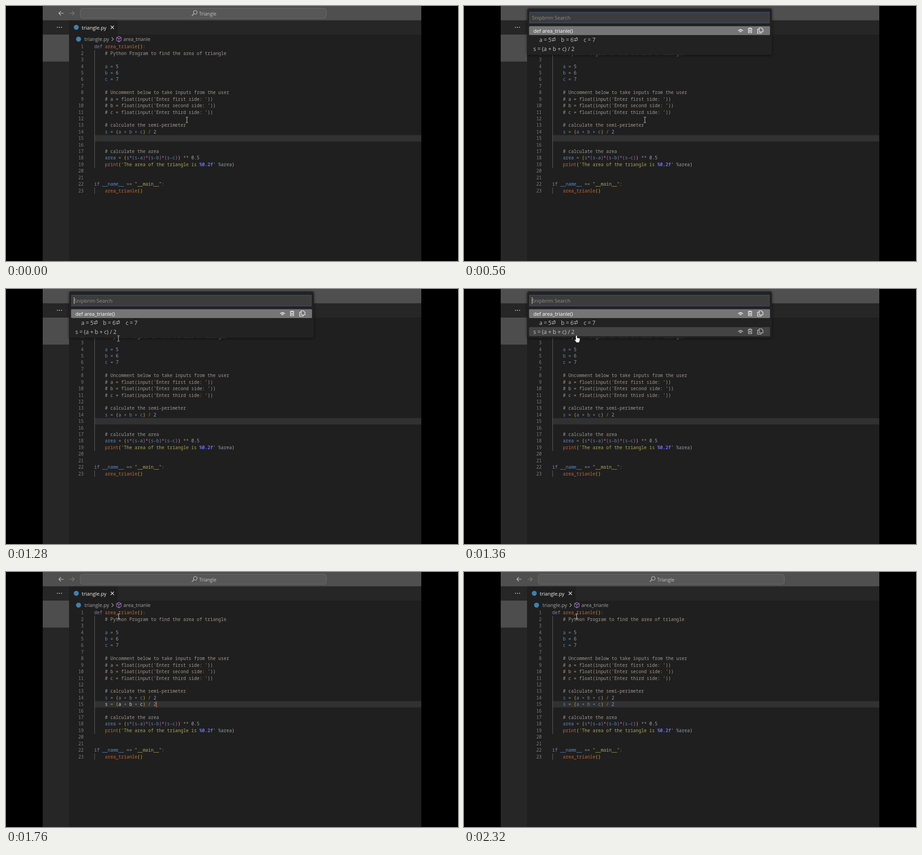
Recreate the animation shown at these times as an HTML page. Size 997 by 562 pixels, loop 2720 ms.

```html
<!DOCTYPE html>
<html lang="en">
<head>
<meta charset="utf-8">
<title>Editor clipboard search</title>
<style>
  html, body { margin: 0; width: 100%; height: 100%; overflow: hidden; background: #000; }
  svg { display: block; width: 997px; height: 562px; }
  text { white-space: pre; }
  .ui { font-family: "Open Sans", "Noto Sans", sans-serif; font-size: 11.1px; fill: #c4c4c4; }
  .code { font-family: "Noto Sans Mono", "DejaVu Sans Mono", monospace; font-size: 9.93px; }
  .num { fill: #7d7d7d; text-anchor: end; }
  .math { font-size: 12.2px; }
  .line { fill: none; stroke: #c8c8c8; stroke-width: 1.2; }
  .k { fill: #8a80ac; }
  .f { fill: #c96530; }
  .p { fill: #d8b236; }
  .m { fill: #b860b6; }
  .c { fill: #9d9993; }
  .v { fill: #5b89c2; }
  .n { fill: #8da0b6; }
  .o { fill: #888; }
  .s { fill: #a5aa56; }
  .b { fill: #6b6cf2; font-weight: bold; }
  .raw .v { fill: #d4d4d4; }
</style>
</head>
<body>
<svg viewBox="0 0 997 562" xmlns="http://www.w3.org/2000/svg">
  <defs>
    <filter id="shadow" x="-10%" y="-30%" width="120%" height="160%">
      <feDropShadow dx="0" dy="1" stdDeviation="3" flood-color="#000" flood-opacity=".6"/>
    </filter>
    <g id="actions" class="line">
      <path d="M604.5 1q5.5-7 11 0"/>
      <circle cx="610" cy="1" r="2"/>
      <path d="M626-4h10M629-4v-1.500h4v1.500M627.500-3.500v8.500h7v-8.500M630-1.500v4.500M632-1.500v4.500"/>
      <path d="M651-6h5l3.500 3.500v5.500h-8.500zM650.500-3h-3v9h8v-2.500"/>
    </g>
    <path id="return" class="line" style="stroke-width:1" d="M0-2.500h5v-2h2.500v6h-6.500M3.500-.5l-2.500 2 2.500 2"/>
  </defs>

  <rect x="81" width="835" height="562" fill="#1f1f1f"/>
  <rect x="81" width="58" height="562" fill="#262626"/>
  <rect x="139" y="31" width="777" height="32" fill="#262626"/>
  <rect x="139" y="31" width="107.500" height="32" fill="#1f1f1f"/>
  <rect x="81" width="835" height="31.500" fill="#4f4f4f"/>
  <rect x="81" y="63" width="58" height="59.500" fill="#4d4d4d"/>
  <g fill="#d0d0d0">
    <circle cx="113.500" cy="47" r="1.100"/><circle cx="118" cy="47" r="1.100"/><circle cx="122.500" cy="47" r="1.100"/>
  </g>

  <g id="title">
    <path class="line" d="M127 16h-10M121 11.500l-4.500 4.500 4.500 4.500"/>
    <path class="line" style="stroke:#808080" d="M140 16h10M146 11.500l4.500 4.500-4.500 4.500"/>
    <rect x="164" y="5" width="542.500" height="22" rx="5" fill="#575757" stroke="#6c6c6c"/>
    <path class="line" d="M410 21.500l4.500-4.500"/><circle class="line" cx="417.500" cy="14" r="4"/>
    <text class="ui" x="426" y="20.500" style="font-size:10.300px">Triangle</text>
  </g>

  <circle cx="155" cy="47" r="5.500" fill="#3f7fb0"/>
  <text class="ui" x="167" y="51.500" style="fill:#f2f2f2;font-weight:500">triangle.py</text>
  <path class="line" style="stroke:#e8e8e8" d="M231 43.500l7 7M238 43.500l-7 7"/>
  <circle cx="160" cy="73" r="5.500" fill="#3f7fb0"/>
  <text class="ui" x="173" y="77" style="fill:#a6a6a6">triangle.py</text>
  <path class="line" style="stroke:#a0a0a0" d="M233 69l4 4-4 4"/>
  <path class="line" style="stroke:#a678c8" d="M249 67l5 2.500v6.500l-5 3-5-3v-6.500zM244 69.500l5 2.500 5-2.500M249 72v7"/>
  <text class="ui" x="259" y="77" style="fill:#a6a6a6;font-size:10.800px">area_trianle</text>

  <rect x="195" y="284.500" width="721" height="14" fill="#313132"/>
  <path d="M195.500 97v260M195.500 400v14" stroke="#606060"/>
  <g id="code" class="code"></g>
  <rect id="editCaret" x="331.200" y="285" width="1.300" height="13.500" fill="#cf7b45"/>

  <g id="palette">
    <rect x="139.500" y="5.500" width="539.500" height="102" rx="4" fill="#222" filter="url(#shadow)"/>
    <rect x="144" y="13" width="530" height="25" fill="#3c3c3c"/>
    <rect id="focus" x="144.500" y="13.500" width="529" height="24" fill="none" stroke="#34508f"/>
    <text class="ui" x="150" y="30" style="fill:#8f8f8f">Snipbrim Search</text>
    <rect id="inputCaret" x="149.700" y="18" width="1.100" height="15" fill="#d8d8d8"/>
    <rect x="143.500" y="44.500" width="531.500" height="19.500" rx="2" fill="#757575"/>
    <text class="ui" x="153" y="58.500" style="fill:#fff">def area_trianle()</text>
    <use href="#actions" y="54" style="filter:brightness(1.250)"/>
    <text class="ui math" x="166" y="78.500">a = 5</text>
    <use href="#return" x="193.500" y="74.500"/>
    <text class="ui math" x="214" y="78.500">b = 6</text>
    <use href="#return" x="242.500" y="74.500"/>
    <text class="ui math" x="264" y="78.500">c = 7</text>
    <g id="hover">
      <rect x="143.500" y="84" width="531.500" height="20" rx="2" fill="#434343"/>
      <use href="#actions" y="93.500"/>
    </g>
    <text class="ui math" x="153" y="98.500">s = (a + b + c) / 2</text>
  </g>

  <path id="beam" d="M-2.500-6h2l.5.500.500-.500h2M0-5.500v11M-2.500 6h2l.5-.5.500.500h2" fill="none" stroke="#d0d0d0"/>
  <path id="hand" fill="#fff" stroke="#222" stroke-width=".8" stroke-linejoin="round"
    d="M-1.500 1q1.500-2 3 0v4.500l5 1q1.500.5 1.500 2l-1 4.500-1 3h-6l-4-5.500q-.5-2 1.500-1l1 1z"/>
</svg>

<script>
const FRAME = 80, LOOP = 2720;
const $ = id => document.getElementById(id);

// Each line alternates token class and text.
const formula = ['v', '    s', 'o', ' = ', 'p', '(', 'v', 'a', 'o', ' + ', 'v', 'b', 'o', ' + ', 'v', 'c', 'p', ')', 'o', ' / ', 'n', '2'];
const assign = (name, value) => ['v', '    ' + name, 'o', ' = ', 'n', value];
const note = s => ['c', '    # ' + s];
const ask = (name, nth) => note(`${name} = float(input('Enter ${nth} side: '))`);
const factor = name => ['o', '*', 'm', '(', 'v', 's', 'o', '-', 'v', name, 'm', ')'];

const lines = [
  ['k', 'def ', 'f', 'area_trianle', 'p', '()', 'o', ':'],
  note('Python Program to find the area of triangle'),
  [],
  assign('a', '5'), assign('b', '6'), assign('c', '7'),
  [],
  note('Uncomment below to take inputs from the user'),
  ask('a', 'first'), ask('b', 'second'), ask('c', 'third'),
  [],
  note('calculate the semi-perimeter'),
  formula, formula,
  [],
  note('calculate the area'),
  ['v', '    area', 'o', ' = ', 'p', '(', 'v', 's', ...factor('a'), ...factor('b'), ...factor('c'), 'p', ')', 'o', ' ** ', 'n', '0.5'],
  ['f', '    print', 'p', '(', 's', "'The area of the triangle is ", 'b', '%0.2f', 's', "'", 'o', ' %', 'n', 'area', 'p', ')'],
  [], [],
  ['k', 'if ', 'v', '__name__', 'o', ' == ', 's', '"__main__"', 'o', ':'],
  ['f', '    area_trianle', 'p', '()'],
];

function el(tag, attrs, parent, text = '') {
  const node = document.createElementNS('http://www.w3.org/2000/svg', tag);
  for (const k in attrs) node.setAttribute(k, attrs[k]);
  node.textContent = text;
  return parent.appendChild(node);
}

const rows = lines.map((tokens, i) => {
  const y = 93.3 + i * 14.42;
  el('text', { class: 'num', x: 171.3, y }, $('code'), i + 1);
  const row = el('text', { x: 194.5, y }, $('code'));
  for (let j = 0; j < tokens.length; j += 2) {
    el('tspan', { class: tokens[j] }, row, tokens[j + 1]);
  }
  return row;
});
const pasted = rows[14];

// Pointer path: time, x, y
const path = [
  [0, 399, 251], [560, 399, 251], [720, 394, 246], [880, 374, 227], [1040, 346, 201],
  [1120, 312, 168], [1200, 270, 129], [1280, 248, 109], [1360, 248, 102],
  [1520, 248.5, 98], [LOOP, 248.5, 98],
];

function pointer(t) {
  const i = path.findIndex(p => p[0] > t);
  const [t0, x0, y0] = path[i - 1], [t1, x1, y1] = path[i];
  const k = (t - t0) / (t1 - t0);
  return [x0 + (x1 - x0) * k, y0 + (y1 - y0) * k];
}

const show = (node, on) => { node.style.display = on ? '' : 'none'; };
const within = (t, a, b) => t >= a && t < b;

function draw(now) {
  const t = Math.floor(now % LOOP / FRAME) * FRAME;
  const open = within(t, 80, 1760), hovering = within(t, 1360, 1760);
  show($('palette'), open);
  show($('title'), !open);
  show($('focus'), t < 1680);
  show($('inputCaret'), within(t, 80, 560) || within(t, 1120, 1680));
  show($('hover'), hovering);
  show(pasted, t >= 1760);
  pasted.setAttribute('class', t < 2160 ? 'raw' : '');
  show($('editCaret'), within(t, 1760, 2240));
  show($('beam'), !hovering);
  show($('hand'), hovering);
  const move = `translate(${pointer(t)})`;
  $('beam').setAttribute('transform', move);
  $('hand').setAttribute('transform', move);
}

const start = performance.now();
function tick() {
  draw(performance.now() - start);
  requestAnimationFrame(tick);
}
tick();
</script>
</body>
</html>
```
